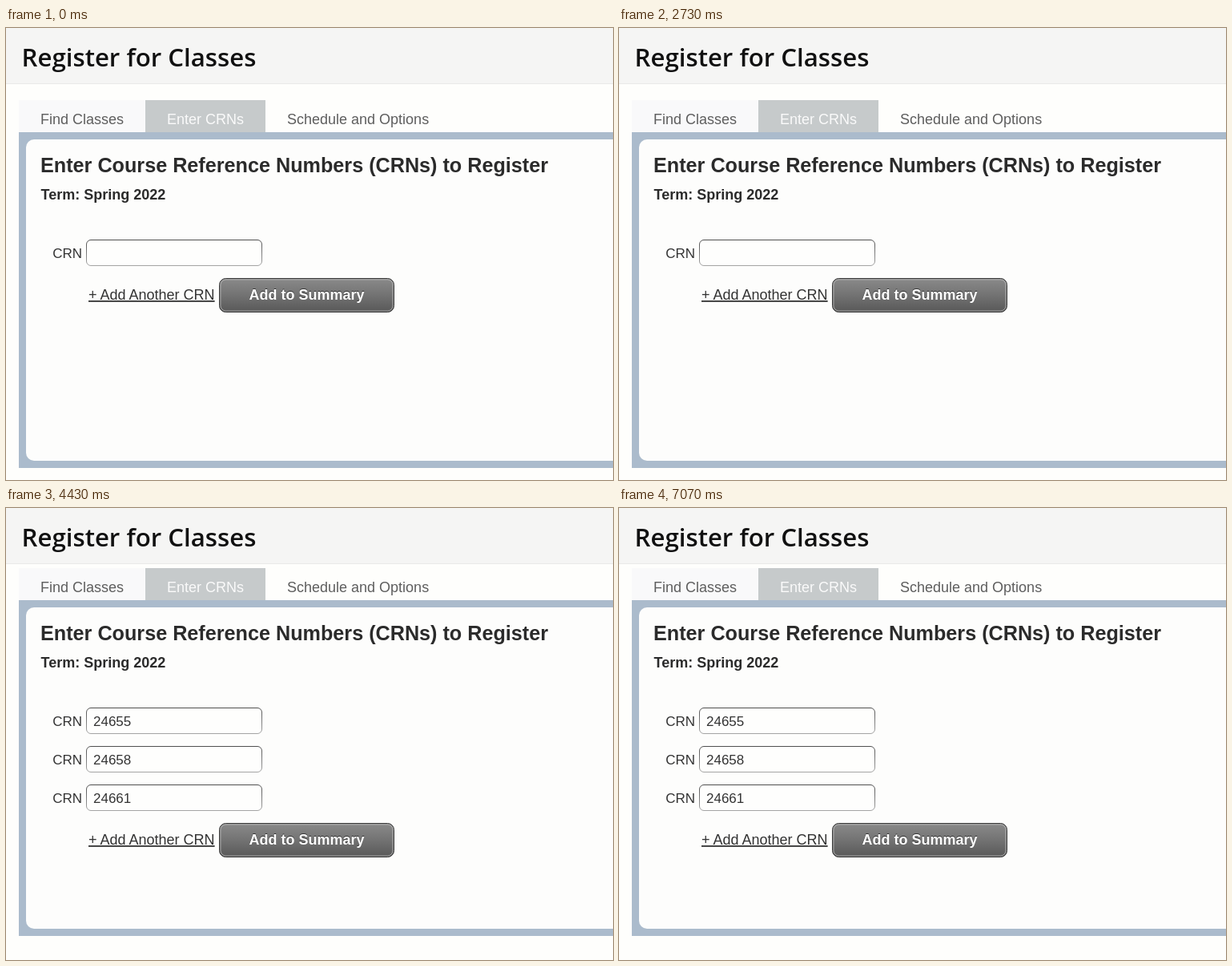
These frames come from a looping animation (758x564 px, 7170 ms). An HTML page:

```html
<!DOCTYPE html>
<html lang="en">
<head>
<meta charset="utf-8">
<title>Register for Classes</title>
<style>
  html, body { margin: 0; width: 100%; height: 100%; overflow: hidden; background: #fefefc; }
  svg { display: block; }
  text { font: 18px "Liberation Sans", Arial, sans-serif; fill: #333; white-space: pre; }
  text.title { font: 600 31.2px "Open Sans", sans-serif; fill: #111; }
  text.heading { font-size: 25.2px; font-weight: bold; fill: #2b2b2b; }
  text.bold { font-weight: bold; fill: #2b2b2b; }
  text.tab { fill: #5e5e5e; }
  text.active { fill: #fafafa; }
  text.field { font-size: 17px; }
  text.link { text-decoration: underline; }
  text.label { font-weight: bold; fill: #fff; }
  text.shade { font-weight: bold; fill: #333; }
</style>
</head>
<body>
<svg width="758" height="564" viewBox="0 0 758 564">
  <defs>
    <linearGradient id="face" x2="0" y2="1">
      <stop offset="0" stop-color="#8a8a8a"/>
      <stop offset=".45" stop-color="#757575"/>
      <stop offset="1" stop-color="#585858"/>
    </linearGradient>
    <linearGradient id="edge" x2="0" y2="1">
      <stop offset="0" stop-color="#505050"/>
      <stop offset="1" stop-color="#a4a4a4"/>
    </linearGradient>
  </defs>

  <rect width="758" height="69" fill="#f5f5f4"/>
  <rect y="69" width="758" height="1" fill="#e9e9e8"/>
  <text class="title" x="19.5" y="48">Register for Classes</text>

  <g id="page">
    <rect x="16" y="90" width="158" height="40" fill="#f9f9fa"/>
    <rect x="174" y="90" width="150" height="40" fill="#c6cacb"/>
    <text class="tab" x="43" y="120">Find Classes</text>
    <text class="active" x="201" y="120">Enter CRNs</text>
    <text class="tab" x="351" y="120">Schedule and Options</text>

    <rect x="16" y="130" width="760" height="419" fill="#abbbcc"/>
    <rect x="25" y="139" width="760" height="401" rx="10" fill="#fdfdfc"/>
    <text class="heading" x="43" y="180">Enter Course Reference Numbers (CRNs) to Register</text>
    <text class="bold" x="43.5" y="214">Term: Spring 2022</text>

    <g id="rows"></g>

    <g id="actions">
      <text class="link" x="103" y="339">+ Add Another CRN</text>
      <rect x="266.5" y="312.5" width="218" height="42" rx="8" fill="url(#face)" stroke="#3a3a3a"/>
      <rect x="268" y="314" width="215" height="39" rx="6.5" fill="none" stroke="#bbb" stroke-opacity=".75"/>
      <text class="shade" x="303.5" y="338">Add to Summary</text>
      <text class="label" x="303.5" y="339">Add to Summary</text>
    </g>
  </g>
</svg>
<script>
  const LOOP = 7170, SWITCH = 3580, ROW = 48;
  const [page, rows, actions] = ["page", "rows", "actions"].map(id => document.getElementById(id));
  let shown;

  const row = (value, i) => `<g transform="translate(0 ${i * ROW})">
    <text class="field" x="58.2" y="287">CRN</text>
    <rect x="100.5" y="264.5" width="219" height="32" rx="5.5" fill="#fefefd" stroke="url(#edge)"/>
    <text class="field" x="109" y="287">${value}</text>
  </g>`;

  function show(values, shift) {
    rows.innerHTML = values.map(row).join("");
    page.setAttribute("transform", `translate(0 ${shift})`);
    actions.setAttribute("transform", `translate(0 ${(values.length - 1) * ROW})`);
  }

  function frame() {
    const filled = performance.now() % LOOP >= SWITCH;
    if (filled !== shown) {
      shown = filled;
      if (filled) show(["24655", "24658", "24661"], -15);
      else show([""], 0);
    }
    requestAnimationFrame(frame);
  }
  frame();
</script>
</body>
</html>
```
